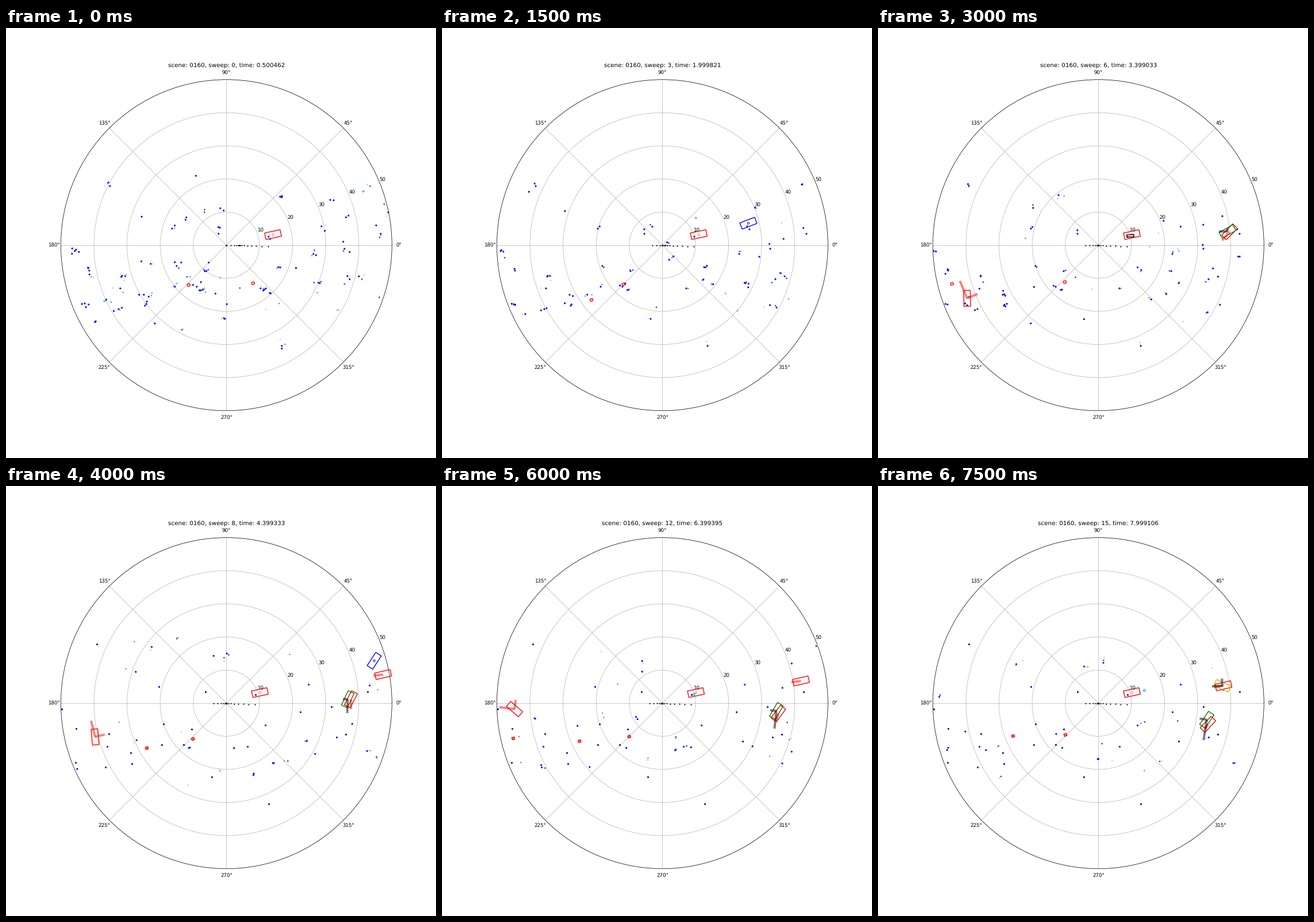
Recreate the animation shown at these times as a matplotlib script. Size 748x748 px, loop 8 s.

```python
import numpy as np
import matplotlib.pyplot as plt
from matplotlib.animation import FuncAnimation
from matplotlib.patches import Polygon

plt.rcParams["text.hinting"] = "none"

SIZE, FRAMES, STEP_MS = 748, 16, 500
CX, CY, RADIUS = 383.35, 377.7, 288
STOP_SWEEP, STOP_DIST = 6, 22.8                 # the ego car brakes to a halt
TIMES = [0.500462, 1.000337, 1.500183, 1.999821, 2.49941, 2.949327, 3.399033, 3.899204,
         4.399333, 4.899351, 5.399362, 5.899381, 6.399395, 6.899402, 7.449213, 7.999106]
TINTS = np.array(["#0000ff", "#2a62c0", "#5cb5a5", "#a5e5c5"])
DOT_AREA = np.array([13, 11, 10, 9])

# Fixed reflectors, placed as seen from the parked car.
REFLECTORS = [(451, 416), (512, 393), (566, 384), (523, 444), (217, 464), (179, 431), (176, 453),
              (122, 422), (121, 481), (173, 489), (320, 455), (323, 423), (274, 414), (420, 453),
              (629, 358), (434, 363), (591, 432), (158, 275), (271, 450), (219, 483), (97, 388),
              (575, 437), (309, 450), (347, 358), (358, 506), (457, 553), (526, 345), (266, 349)]

# Box colour, arrow colour, side arrow ratio, keys: sweep, x, y, heading, arrow heading, length.
CARS = [
    ("red", "red", 0.6, [(4, 155, 504, 88, 121, 37), (8, 155, 436.5, 95, 104, 29),
                         (13, 119, 376, 150, 190, 26)]),
    ("red", "red", 0, [(4, 623, 338, 28, 190, 22), (8, 600, 371, 63, 270, 17),
                       (15, 574, 414.5, 47, 240, 10)]),
    ("green", "black", 0.35, [(6, 608, 354, 30, 180, 15), (8, 594.5, 371, 65, 268, 24),
                              (15, 572, 406.5, 56, 261, 36)]),
    ("red", "red", 0, [(8, 656, 328, 13, 187, 17), (15, 601, 347.5, 13, 187, 17)]),
    ("y", "black", 0.7, [(14, 604, 346, -20, 183, 18), (15, 599, 347.5, -24, 183, 18)]),
]
# Keys: sweep, x, y.
WALKERS = [
    [(0, 295, 447), (2, 322, 445), (4, 299, 447), (6, 325, 442), (15, 326, 433)],
    [(8, 245, 456), (15, 235, 435)],
    [(4, 130, 446), (7, 128, 444.5)],
    [(11, 125, 440), (13, 123, 438)],
    [(0, 407, 444), (1, 407, 444)],
    [(2, 255, 473), (3, 255, 473)],
]
# Short-lived boxes: first and last sweep, x, y, heading, colour.
GUESSES = [(2, 3, 528, 339.5, 21, "blue"), (4, 5, 528, 338, -65, "c"),
           (8, 8, 640.5, 304, 57, "blue")]

fig = plt.figure(figsize=(12, 12), dpi=SIZE / 12)
ax = fig.add_subplot(projection="polar")
ax.set_ylim(0, 50)
ax.set_yticks(range(10, 51, 10))
title = ax.set_title("")
stage = fig.add_axes([0, 0, 1, 1])


def to_stop(k):
    """Distance the ego car still has to roll, in pixels."""
    return STOP_DIST * max(0, 1 - k / STOP_SWEEP) ** 2.2


def at(track, k):
    """Interpolated values of a keyed track, or None outside its life."""
    keys = np.array(track, float)
    if not keys[0, 0] <= k <= keys[-1, 0]:
        return None
    return [np.interp(k, keys[:, 0], col) for col in keys.T[1:]]


def toward(angle, length):
    a = np.radians(angle)
    return length * np.array([np.cos(a), -np.sin(a)])


def box(x, y, angle, color, length=27.5, width=11.5, lw=1.6, **style):
    u, v = toward(angle, length / 2), toward(angle - 90, width / 2)
    corners = np.array([u + v, u - v, -u - v, -u + v]) + (x, y)
    stage.add_patch(Polygon(corners, fill=False, ec=color, lw=lw, **style))


def arrow(x, y, angle, length, color):
    dx, dy = toward(angle, length)
    stage.plot([x, x + dx], [y, y + dy], color=color, alpha=0.5, lw=4.6,
               solid_capstyle="butt")


def scatter_returns(points, tint):
    inside = np.hypot(*(points - (CX, CY)).T) < RADIUS
    points, tint = points[inside], tint[inside]
    stage.scatter(*points.T, s=DOT_AREA[tint], c=TINTS[tint], lw=0)


def draw_reflectors(k, shift):
    """Each reflector keeps its main return and sheds its echoes over time."""
    fade = np.exp(-k / 4)
    for i, spot in enumerate(REFLECTORS):
        rng = np.random.default_rng(i)
        echoes = rng.normal(0, 2 + 3 * fade, (5, 2))
        echoes[0] = 0
        tint = rng.choice(4, 5, p=[0.5, 0.22, 0.17, 0.11])
        tint[0] = 0
        seen = 1 + round(rng.uniform(1.5, 4) * fade)
        scatter_returns((echoes + spot + (shift, 0))[:seen], tint[:seen])


def draw_clutter(k, shift):
    """Passing returns, mostly along the roadside below, renewed every second sweep."""
    rng = np.random.default_rng(k // 2)
    n = round(24 + 16 * np.exp(-k / 4))
    below = rng.random(n) < 0.68
    x = rng.uniform(100, 668, n)
    y = np.where(below, rng.normal(455, 35, n), rng.normal(318, 32, n))
    points = np.column_stack([x + shift, y])
    pairs = points[: n // 2] + rng.normal(0, 3, (n // 2, 2))
    tint = rng.choice(4, n + n // 2, p=[0.5, 0.18, 0.18, 0.14])
    scatter_returns(np.vstack([points, pairs]), tint)


def draw_path(shift):
    past = -STOP_DIST + np.array([STOP_DIST - to_stop(j) for j in range(STOP_SWEEP + 1)])
    future = 50 * (np.arange(1, 9) / 8) ** 1.86
    x = np.concatenate([past, future])
    stage.scatter(CX + x + shift, CY + 0.2 + 1.9 * np.clip(x / 40, 0, 1), s=6, c="black", lw=0)
    stage.scatter([CX], [CY], s=11, c="#000060", lw=0)


def draw_boxes(k, shift):
    box(441.7 + shift, 359.4, 12, "red")
    box(441.7 + shift, 359.4, 12, "red", 3, 3, 0.9, alpha=0.6)
    for first, last, x, y, angle, color in GUESSES:
        if first <= k <= last:
            box(x + shift, y, angle, color)
            box(x + shift, y, angle, "black", 3, 3, 0.9)
    for color, arrow_color, side, track in CARS:
        state = at(track, k)
        if state:
            x, y, angle, course, speed = state
            x += shift
            arrow(x, y, course, speed, arrow_color)
            if side:
                arrow(x, y, course - 90, speed * side, arrow_color)
            box(x, y, angle, color)
    for track in WALKERS:
        spot = at(track, k)
        if spot:
            x, y = spot[0] + shift, spot[1]
            box(x, y, 20, "red", 4.5, 4)
            if k >= 8:
                stage.scatter([x], [y], s=30, c="red", marker="s", alpha=0.5, lw=0)
    if 6 <= k <= 7:
        box(439, 361.5, 3, "black", 12.5, 4)
    if k >= 12:
        x, y = (438.5, 362) if k < 14 else (463, 355)
        stage.plot(x, y, "h", ms=4.5, mfc="none", mec="c", mew=1.4)


def update(k):
    stage.clear()
    stage.set(xlim=(0, SIZE), ylim=(SIZE, 0))
    stage.axis("off")
    shift = to_stop(k)
    title.set_text(f"scene: 0160, sweep: {k}, time: {TIMES[k]}")
    draw_reflectors(k, shift)
    draw_clutter(k, shift)
    draw_path(shift)
    draw_boxes(k, shift)
    return []


anim = FuncAnimation(fig, update, frames=FRAMES, interval=STEP_MS, init_func=lambda: [],
                     repeat=True, repeat_delay=0)
plt.show()
```
